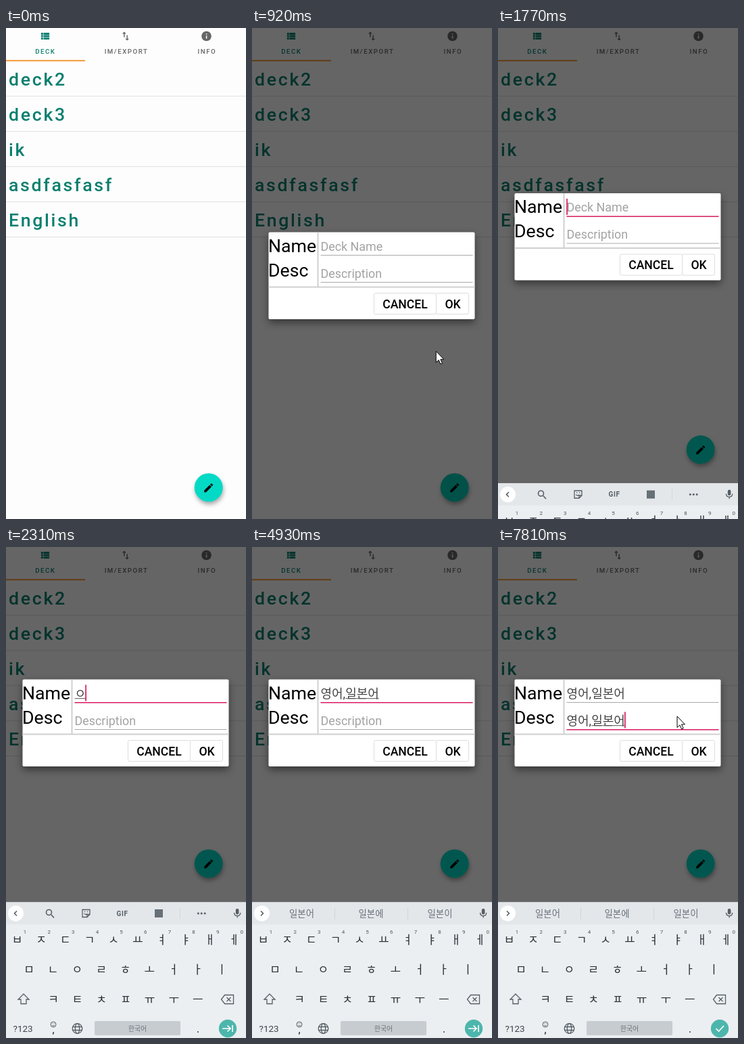
Animation of 355x725 px, one loop 8000 ms. Source, as an HTML page:

```html
<!DOCTYPE html>
<html lang="en">
<head>
<meta charset="utf-8">
<title>New deck</title>
<style>
html, body { margin: 0; width: 100%; height: 100%; overflow: hidden; background: #fdfdfd; }
svg { display: block; width: 100vw; height: 100vh; font-family: Roboto, "Noto Sans CJK KR", "Noto Sans CJK", sans-serif; }
.mid { text-anchor: middle; }
.tab { font-size: 9.7px; font-weight: 500; letter-spacing: 1.5px; text-anchor: middle; fill: #666; }
.deck { font-size: 26.7px; font-weight: 500; letter-spacing: .1em; fill: #0b7f6f; }
.label { font-size: 26.7px; }
.field { font-size: 18px; fill: #444; }
.hint { font-size: 17.9px; fill: #a3a3a3; }
.btn { font-size: 17.6px; font-weight: 500; text-anchor: middle; }
.key { font-size: 17px; font-weight: 500; fill: #2b3238; text-anchor: middle; }
.num { font-size: 8px; fill: #4d565c; text-anchor: middle; }
.sug { font-size: 13.4px; fill: #66717a; text-anchor: middle; }
.line { fill: none; stroke: #555f66; stroke-width: 1.3; }
</style>
</head>
<body>
<svg viewBox="0 0 355 725">
  <rect width="355" height="725" fill="#fdfdfd"/>
  <g fill="#666">
    <path fill="#0b7f6f" transform="translate(49 3.4) scale(.72)" d="M4 14h4v-4H4zM4 19h4v-4H4zM4 9h4V5H4zM9 14h12v-4H9zM9 19h12v-4H9zM9 5v4h12V5z"/>
    <path transform="translate(168.4 3.4) scale(.72)" d="M9 3L5 7h3v7h2V7h3zM16 17v-7h-2v7h-3l4 4 4-4z"/>
    <circle cx="296.5" cy="12" r="7.3"/>
    <path fill="#fdfdfd" d="M295.8 11.3h1.5v4.4h-1.5zM295.8 8.3h1.5v1.5h-1.5z"/>
  </g>
  <text class="tab" x="58.3" y="38" style="fill:#0b7f6f">DECK</text>
  <text class="tab" x="178" y="38">IM/EXPORT</text>
  <text class="tab" x="297.4" y="38">INFO</text>
  <rect y="47.3" width="117" height="1.9" fill="#f5942e"/>
  <g id="decks"></g>
  <g id="fab">
    <circle r="21" fill="#03dac6" style="filter:drop-shadow(1px 4px 3px #0005)"/>
    <circle id="ripple" r="21"/>
    <path transform="translate(-8.6 -8.2) scale(.72)" d="M3 17.25V21h3.75L17.81 9.94l-3.75-3.75zM20.71 7.04c.39-.39.39-1.02 0-1.41l-2.34-2.34c-.39-.39-1.02-.39-1.41 0l-1.83 1.83 3.75 3.75z"/>
  </g>
  <rect id="dim" width="355" height="725"/>

  <g id="dialog">
    <rect x="24.5" width="305" height="128.5" rx="2" fill="#fff" style="filter:drop-shadow(0 5px 6px #0007)"/>
    <path d="M97.5 0V80M24.5 81H329.5" stroke="#d0d0d0" stroke-width="2"/>
    <text class="label" x="24" y="29">Name</text>
    <text class="label" x="24" y="65">Desc</text>
    <g id="fields"></g>
    <rect id="caret" width="1.7" height="24" fill="#d81b60"/>
    <g fill="none" stroke="#ddd">
      <rect x="180.5" y="90" width="92" height="31" rx="2"/>
      <rect x="272.5" y="90" width="48" height="31" rx="2"/>
    </g>
    <text class="btn" x="226.5" y="112.3">CANCEL</text>
    <text class="btn" x="297" y="112.3">OK</text>
  </g>

  <g id="board">
    <rect y="524.5" width="355" height="201" fill="#eceff1"/>
    <rect y="524.5" width="355" height="33" fill="#e4e7ea"/>
    <circle cx="14.5" cy="541" r="11.5" fill="#fff"/>
    <path id="chevron" class="line" style="stroke-width:1.6"/>
    <g id="tools">
      <path class="line" style="stroke-width:1.6" d="M67 543l4 4.5"/>
      <circle class="line" style="stroke-width:1.6" cx="63.5" cy="539.5" r="4"/>
      <path class="line" d="M113 535.5h11v7l-4 4h-7zM124 542.5h-4v4M115.5 541q2 3 4.500 .5M116 538.500h1.200M120 538.500h1.200"/>
      <text class="mid" x="172" y="544.7" font-size="10" font-weight="700" letter-spacing=".6" fill="#555f66">GIF</text>
      <rect x="220" y="535" width="12" height="12" fill="#667077"/>
      <path d="M257.500 533v16" stroke="#d3d8dc"/>
      <g fill="#555f66"><circle cx="284.300" cy="541" r="1.500"/><circle cx="289.200" cy="541" r="1.500"/><circle cx="294.100" cy="541" r="1.500"/></g>
    </g>
    <g id="words">
      <path d="M122.500 532.500v17M230.500 532.500v17" stroke="#cfd4d8"/>
      <text class="sug" x="73.500" y="545.800"/><text class="sug" x="176" y="545.800"/><text class="sug" x="278" y="545.800"/>
    </g>
    <rect x="339.800" y="534" width="4.600" height="8.500" rx="2.300" fill="#555f66"/>
    <path class="line" d="M337.500 540q0 4.600 4.600 4.600t4.600-4.600M342.100 544.600v3"/>
    <g id="keys"></g>
    <path class="line" d="M26 660l8 8h-4v6.500h-8V668h-4z"/>
    <path class="line" d="M318.500 668l5-6.500h13v13h-13zM326.500 665l6 6m0-6l-6 6"/>
    <text x="10.500" y="716" font-size="13.500" fill="#3c454b">?123</text>
    <circle class="line" style="stroke-width:1" cx="70" cy="705" r="4"/>
    <path class="line" style="stroke-width:1" d="M68 706q2 2.500 4 0M68.300 703.500h.9M70.800 703.500h.9"/>
    <text class="key" x="70" y="717.500" style="font-size:14px">,</text>
    <g class="line">
      <circle cx="105.500" cy="711" r="7.300"/><ellipse cx="105.500" cy="711" rx="3.200" ry="7.300"/>
      <path d="M99 708.500h13M99 713.500h13"/>
    </g>
    <rect x="131" y="700" width="127" height="21" rx="2" fill="#c7ccd0"/>
    <text class="mid" x="194.500" y="714.500" font-size="10" fill="#697279">한국어</text>
    <text class="key" x="284" y="717" style="font-size:14px">.</text>
    <circle cx="328" cy="711" r="13.200" fill="#4db6ac"/>
    <path id="enter" fill="none" stroke="#fff" stroke-width="1.700"/>
  </g>
  <path id="cursor" d="M0 0V16.500l4-3.600 2.600 6 2.600-1.100-2.600-5.900H11.500z" fill="#fff" stroke="#000"/>
</svg>
<script>
const $ = id => document.getElementById(id);
const clamp = x => Math.max(0, Math.min(1, x));
const ramp = (t, a, b) => clamp((t - a) / (b - a));
const ease = x => x * x * (3 - 2 * x);
const show = (el, on) => el.style.display = on ? '' : 'none';
const put = (el, x, y) => el.setAttribute('transform', `translate(${x} ${y})`);

$('decks').innerHTML = ['deck2', 'deck3', 'ik', 'asdfasfasf', 'English'].map((name, i) =>
  `<text class="deck" x="4" y="${85.3 + 51.9 * i}">${name}</text>
   <rect y="${100.2 + 52 * i}" width="355" height="1" fill="#e0e0e0"/>`).join('');

$('fields').innerHTML = ['Deck Name', 'Description'].map((hint, i) =>
  `<g transform="translate(101.5 ${40 * i})">
     <text class="hint" y="27">${hint}</text><text class="field" y="27"></text>
     <rect class="compose" y="27.700" height="1" fill="#555"/>
     <rect class="base" y="33.500" width="225"/>
   </g>`).join('');

const rows = [['ㅂㅈㄷㄱㅅㅛㅕㅑㅐㅔ', 16.5, 580], ['ㅁㄴㅇㄹㅎㅗㅓㅏㅣ', 34, 624], ['ㅋㅌㅊㅍㅠㅜㅡ', 70, 668]];
$('keys').innerHTML = rows.map(([letters, x, y], r) => [...letters].map((c, i) => {
  const cx = x + 35.65 * i;
  return `<text class="key" x="${cx}" y="${y + 6.3}">${c}</text>` +
    (r ? '' : `<text class="num" x="${cx + 11.5}" y="571">${(i + 1) % 10}</text>`);
}).join('')).join('');

// Typing: the same syllable steps in both fields, each with its own rhythm
const steps = ['ㅇ', '여', '영', '영ㅇ', '영어', '영어,', '영어,ㅇ', '영어,이', '영어,일',
  '영어,일ㅂ', '영어,일보', '영어,일본', '영어,일본ㅇ', '영어,일본어'];
const times = [
  [2310, 2780, 3090, 3170, 3240, 3320, 3630, 3700, 3780, 3860, 4010, 4180, 4250, 4320],
  [6020, 6180, 6260, 6570, 6570, 6950, 7100, 7180, 7180, 7410, 7410, 7640, 7720, 7720]];
const guesses = {
  'ㅇ': 'ㅇ 아 이', '여': '여 여기 여자', '영': '영 영상 영향을', '영어': '영어 영어로 영어를',
  '이': '이 이거 이제', '일': '일 일단 일이', '일보': '일보 일본 일부',
  '일본': '일본 일본은 일본에', '일본어': '일본어 일본에 일본이' };
const typed = (i, t) => steps[times[i].filter(s => s <= t).length - 1] || '';
const lastWord = text => text.split(',').pop();

const NAME_FOCUS = 1220, DESC_FOCUS = 5420;
const trips = [
  [[70, 299, 708], [150, 292, 689], [260, 292, 689], [520, 281, 666], [740, 281, 666], [1070, 265, 322], [1380, 265, 322]],
  [[5180, 268, 290], [5400, 265, 250], [8000, 265, 250]]];

function drawCursor(t) {
  const trip = trips.find(p => t >= p[0][0] && t < p[p.length - 1][0]);
  show($('cursor'), trip);
  if (!trip) return;
  const n = trip.findIndex(p => p[0] > t), [a, x, y] = trip[n - 1], [b, u, v] = trip[n];
  const k = ramp(t, a, b);
  put($('cursor'), x + (u - x) * k, y + (v - y) * k);
}

function drawFields(t) {
  const focus = t >= DESC_FOCUS ? 1 : t >= NAME_FOCUS ? 0 : -1;
  [...$('fields').children].forEach((g, i) => {
    const [hint, field, compose, base] = g.children;
    const text = typed(i, t), active = i === focus;
    if (field.textContent !== text) field.textContent = text;
    show(hint, !text);
    const width = text ? field.getComputedTextLength() : 0;
    const start = text.includes(',') ? field.getSubStringLength(0, 3) : 0;
    show(compose, active && lastWord(text));
    compose.setAttribute('x', start);
    compose.setAttribute('width', width - start);
    base.setAttribute('fill', active ? '#d81b60' : '#aaa');
    base.setAttribute('height', active ? 1.5 : 1);
    if (active) put($('caret'), 101.2 + width - (text ? .5 : 0), 8 + 40 * i);
  });
  show($('caret'), focus >= 0 && !(t >= 4930 && t < DESC_FOCUS));
}

function drawStrip(t) {
  const desc = t >= DESC_FOCUS;
  const word = lastWord(typed(+desc, t - 80)).replace(/(.)[ㄱ-ㅣ]$/, '$1');
  show($('tools'), !word);
  show($('words'), word);
  if (word) guesses[word].split(' ').forEach((w, i) => $('words').children[i + 1].textContent = w);
  $('chevron').setAttribute('d', word ? 'M13 537.500l3.500 3.500-3.500 3.500' : 'M16 537.500l-3.500 3.500 3.500 3.500');
  $('enter').setAttribute('d', desc ? 'M322.500 711l4 4 7.500-8' : 'M320 711h12M327.500 706.500l4.500 4.500-4.500 4.500M335 706v10');
}

function draw(t) {
  const rise = ease(ramp(t, 1690, 1930)), lift = ease(ramp(t, 1270, 1580));
  put($('fab'), 299.7, 678.5 - 211 * rise);
  $('ripple').setAttribute('opacity', .14 * ramp(t, 560, 660) * (1 - ramp(t, 780, 1070)));
  $('dim').setAttribute('opacity', .6 * ramp(t, 625, 775));
  $('dialog').setAttribute('opacity', ramp(t, 625, 725));
  put($('dialog'), 0, 301.5 - 40 * lift - 66 * rise);
  put($('board'), 0, 201 * (1 - rise));
  drawFields(t);
  drawStrip(t);
  drawCursor(t);
}

const begin = performance.now();
function tick() {
  draw((performance.now() - begin) % 8000);
  requestAnimationFrame(tick);
}
tick();
</script>
</body>
</html>
```
